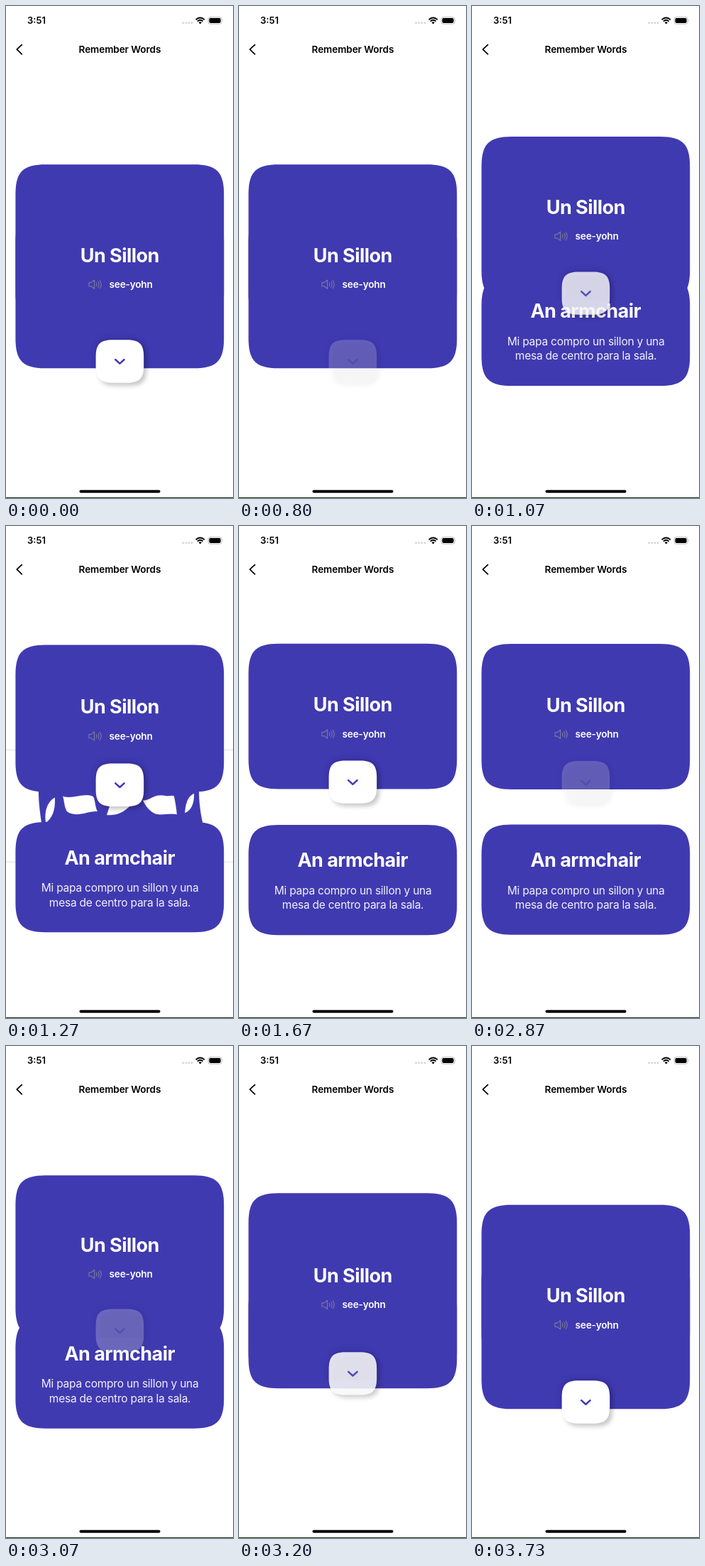
These frames come from a looping animation (320 px wide and 693 px high, 3800 ms). An HTML page:

```html
<!DOCTYPE html>
<html lang="en">
<head>
<meta charset="utf-8">
<title>Remember Words</title>
<style>
  html, body { margin: 0; width: 100%; height: 100%; overflow: hidden; background: #fff; }
  svg { display: block; width: 100%; height: 100%; }
  text { font-family: Inter, Roboto, sans-serif; font-weight: 600; font-size: 13.6px; }
  .mid { text-anchor: middle; }
  .title { font-weight: 700; font-size: 27px; letter-spacing: -.55px; fill: #fff; }
  .body { font-weight: 400; font-size: 15.5px; letter-spacing: -.23px; fill: #f2f1fb; }
  .card { fill: #403ab0; }
</style>
</head>
<body>
<svg viewBox="0 0 320 693" preserveAspectRatio="none">
  <defs>
    <filter id="soft" x="-40%" y="-40%" width="180%" height="180%"><feGaussianBlur stdDeviation="3"/></filter>
    <filter id="halo" x="-40%" y="-40%" width="180%" height="180%"><feGaussianBlur stdDeviation="4"/></filter>
    <clipPath id="inCard"><path id="clipShape"/></clipPath>
  </defs>
  <rect width="320" height="693" fill="#fff"/>

  <g id="goo">
    <rect x="45" y="-2" width="232" height="47" class="card"/>
    <g id="holes" fill="#fff" stroke-linejoin="round">
      <path d="M-60 -60H46V0C46 14 48 30 50 43V100H-60Z"/>
      <path d="M380 -60H272V0C272 14 274 30 277 43V100H380Z"/>
      <path d="M69 8C60 12 53 26 56 44C65 38 70 26 69 8Z"/>
      <path d="M80 6C92 11 108 1 122 6C126 8 125 20 129 28C118 26 100 38 86 28C82 22 82 12 80 6Z"/>
      <path d="M142 33C146 20 150 4 162 4C178 4 177 14 175 20C165 30 156 34 142 33Z"/>
      <path d="M193 12C204 12 208 3 222 5C230 7 234 4 237 6C239 16 240 22 241 32C225 30 214 36 205 28C198 22 196 18 193 12Z"/>
      <path d="M265 2C254 8 253 20 252 30C262 27 266 14 265 2Z"/>
    </g>
  </g>

  <path id="answer" class="card"/>
  <g id="answerText" class="mid">
    <text class="title" x="160.2" y="59.5">An armchair</text>
    <text class="body" x="160.6" y="98">Mi papa compro un sillon y una</text>
    <text class="body" x="160.6" y="118.5">mesa de centro para la sala.</text>
  </g>

  <path id="word" class="card"/>
  <g id="wordText">
    <text class="title mid" x="160.2" y="360.5">Un Sillon</text>
    <text x="145.6" y="397" fill="#fff" letter-spacing="-.2">see-yohn</text>
    <g fill="none" stroke="#7d7b9c" stroke-width="1.1" stroke-linecap="round" stroke-linejoin="round">
      <path d="M117 389.6H120L124.6 386V398.2L120 394.8H117Z"/>
      <path d="M127.3 390Q128.8 392.2 127.3 394.4M129.8 388.3Q132.4 392.2 129.8 396.1M132.3 386.7Q136.2 392.2 132.3 397.7"/>
    </g>
  </g>

  <g clip-path="url(#inCard)"><path id="halo1" fill="#1f1a78" filter="url(#halo)"/></g>
  <path id="shade" filter="url(#soft)"/>
  <path id="button" fill="#fff"/>
  <g id="arrow" fill="none" stroke-linecap="round" stroke-linejoin="round" stroke-width="2.5">
    <path d="M158 31.5L164 37L170 31.5" stroke="#000" stroke-opacity=".06" filter="url(#soft)"/>
    <path d="M154.2 27.7L160.4 33.4L166.6 27.7" stroke="#403ab0"/>
  </g>

  <text x="30" y="25.4" font-size="13" style="font-size:13px">3:51</text>
  <g fill="#c9c9cb">
    <circle cx="249.6" cy="23.8" r="1.2"/><circle cx="253.7" cy="23.8" r="1.2"/>
    <circle cx="257.8" cy="23.8" r="1.2"/><circle cx="261.9" cy="23.8" r="1.2"/>
  </g>
  <g fill="none" stroke="#000" stroke-width="1.9">
    <path d="M267.6 19.2Q273.7 13.6 279.8 19.2M269.8 21.6Q273.7 18 277.6 21.6"/>
    <path d="M271.6 23.2Q273.7 21.5 275.8 23.2L273.7 25.4Z" fill="#000" stroke="none"/>
  </g>
  <rect x="285" y="15.7" width="19" height="9.6" rx="3" fill="none" stroke="#b5b5b5" stroke-width=".9"/>
  <rect x="286.4" y="17.1" width="16.2" height="6.8" rx="1.8"/>
  <path d="M305 18.9Q306.6 20.5 305 22.1Z" fill="#b5b5b5"/>

  <path d="M22.3 54.6L15.3 61.2L22.3 67.9" fill="none" stroke="#000" stroke-width="1.8" stroke-linecap="round" stroke-linejoin="round"/>
  <text class="mid" x="160.4" y="66.2" letter-spacing="-.1">Remember Words</text>
  <rect x="103.5" y="681.8" width="114" height="4" rx="2"/>
  <rect y="692" width="320" height="1" fill="#123c12"/>
</svg>
<script>
  const LOOP = 3800, FPS = 15, OPEN = 800, CLOSE = 2866;
  const STRETCH = 43, SNAP = 49.2;
  const el = id => document.getElementById(id);
  const set = (id, attrs) => { for (const k in attrs) el(id).setAttribute(k, attrs[k]); };
  const mix = (a, b, p) => a + (b - a) * p;

  // Rectangle with continuous corners that reach e along each side
  function squircle(x, y, w, h, e) {
    const c = e * .25, r = x + w, b = y + h;
    return `M${x + e} ${y}H${r - e}C${r - c} ${y} ${r} ${y + c} ${r} ${y + e}` +
      `V${b - e}C${r} ${b - c} ${r - c} ${b} ${r - e} ${b}` +
      `H${x + e}C${x + c} ${b} ${x} ${b - c} ${x} ${b - e}` +
      `V${y + e}C${x} ${y + c} ${x + c} ${y} ${x + e} ${y}Z`;
  }

  // Lightly underdamped spring from 0 to 1, ms in
  function spring(ms) {
    if (ms <= 0) return 0;
    const s = ms / 1000, decay = 7.47, freq = 5.02;
    return 1 - Math.exp(-decay * s) * (Math.cos(freq * s) + decay / freq * Math.sin(freq * s));
  }

  function buttonAlpha(since, release) {
    if (since < 0) return 1;
    const u = Math.min(1, Math.max(0, (since - release) / 250));
    return mix(.2, 1, u < .5 ? 2 * u * u : 1 - 2 * (1 - u) ** 2);
  }

  function drawGoo(top, gap) {
    const visible = gap > 0 && gap < SNAP;
    set('goo', { visibility: visible ? 'visible' : 'hidden' });
    if (!visible) return;
    const extra = gap - STRETCH;
    set('goo', { transform: `translate(0 ${top}) scale(1 ${gap / STRETCH})` });
    set('holes', {
      stroke: extra > 0 ? '#fff' : '#403ab0',
      'stroke-width': extra > 0 ? extra * 5 : -extra * .3
    });
  }

  function draw(time) {
    const t = Math.floor((time + 1) * FPS / 1000) * 1000 / FPS;
    const closing = t >= CLOSE;
    const since = t - (closing ? CLOSE : OPEN);
    const delay = closing ? 90 : 35;
    const p = closing ? 1 - spring(since - delay) : spring(since - delay);
    const alpha = buttonAlpha(since, delay + 70);

    const top = mix(223.3, 166, p), bottom = mix(510.3, 370.9, p);
    const answerTop = mix(290.5, 420.5, p), buttonTop = mix(470.3, 330.9, p);
    const card = squircle(13.4, top, 293.8, bottom - top, 42);
    const button = squircle(126.6, buttonTop, 67.6, 60.4, 24);

    drawGoo(bottom, answerTop - bottom);
    set('answer', { d: squircle(13.4, answerTop, 293.8, 155.2, 42) });
    set('answerText', { transform: `translate(0 ${answerTop})` });
    set('word', { d: card });
    set('clipShape', { d: card });
    set('wordText', { transform: `translate(0 ${-98.7 * p})` });
    set('halo1', { d: button, transform: 'translate(0 -2)', opacity: .4 * alpha });
    set('shade', { d: button, transform: 'translate(4 4)', opacity: .22 * alpha });
    set('button', { d: button, opacity: alpha });
    set('arrow', { transform: `translate(0 ${buttonTop})`, opacity: mix(.35, 1, alpha) });
  }

  const start = performance.now();
  function tick() {
    draw((performance.now() - start) % LOOP);
    requestAnimationFrame(tick);
  }
  tick();
</script>
</body>
</html>
```
